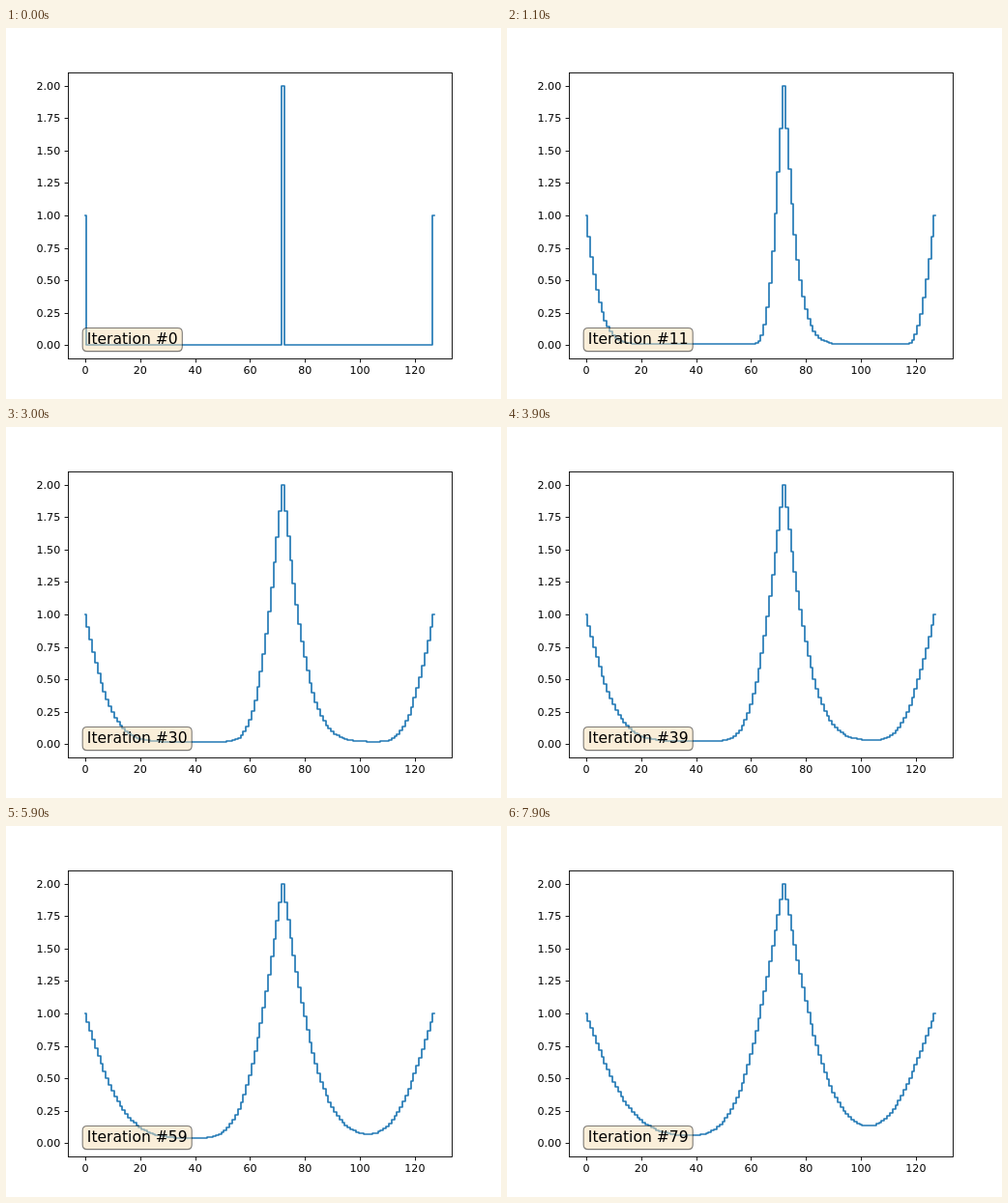
These frames come from a looping animation (512 px wide and 384 px high, 8000 ms). An HTML page with a canvas:

```html
<!DOCTYPE html>
<html lang="en">
<head>
<meta charset="utf-8">
<title>Relaxation</title>
<style>
html, body { margin: 0; width: 100%; height: 100%; overflow: hidden; background: #fff; }
canvas { display: block; }
</style>
</head>
<body>
<canvas id="plot" width="512" height="384"></canvas>
<script>
const ctx = document.getElementById('plot').getContext('2d');
const N = 128, PEAK = 72, STEPS = 80, STEP_MS = 100;
const SOURCE = 10 / N ** 2;
const FONT = '"DejaVu Sans", sans-serif';
const px = x => 82.036 + x * 2.8404;
const py = y => 328.32 - y * 134.4;
const snap = v => Math.floor(v + 0.5);

// Gauss-Seidel sweeps with both ends and the peak held fixed
const states = [new Float64Array(N)];
states[0][0] = states[0][N - 1] = 1;
states[0][PEAK] = 2;
for (let k = 1; k < STEPS; k++) {
  const u = states[k - 1].slice();
  for (let i = 1; i < N - 1; i++) {
    if (i !== PEAK) u[i] = (u[i - 1] + u[i + 1] + SOURCE) / 2;
  }
  states.push(u);
}

function segment(x1, y1, x2, y2) {
  ctx.beginPath();
  ctx.moveTo(x1, y1);
  ctx.lineTo(x2, y2);
  ctx.stroke();
}

function drawAxes() {
  ctx.strokeStyle = ctx.fillStyle = '#000';
  ctx.lineWidth = 0.889;
  ctx.lineCap = 'butt';
  ctx.lineJoin = 'miter';
  ctx.strokeRect(64.5, 46.5, 397, 296);
  ctx.font = '11.11px ' + FONT;
  ctx.textAlign = 'center';
  for (let v = 0; v <= 120; v += 20) {
    const x = snap(px(v)) + 0.5;
    segment(x, 342.5, x, 346.4);
    ctx.fillText(v, px(v), 358);
  }
  ctx.textAlign = 'right';
  for (let v = 0; v <= 2; v += 0.25) {
    const y = snap(py(v)) + 0.5;
    segment(60.6, y, 64.5, y);
    ctx.fillText(v.toFixed(2), 56.2, snap(py(v) + 4));
  }
}

function drawCurve(u) {
  ctx.strokeStyle = '#1f77b4';
  ctx.lineWidth = 1.667;
  ctx.lineCap = 'square';
  ctx.lineJoin = 'round';
  ctx.beginPath();
  for (let i = 0; i < N; i++) {
    const y = snap(py(u[i]));
    ctx.lineTo(snap(px(Math.max(i - 0.5, 0))), y);
    ctx.lineTo(snap(px(Math.min(i + 0.5, N - 1))), y);
  }
  ctx.stroke();
}

function drawLabel(k) {
  const text = 'Iteration #' + k;
  ctx.font = '15.56px ' + FONT;
  ctx.textAlign = 'left';
  const pad = 4.67, l = 83.84 - pad, t = 310.5, b = 334.6;
  const r = 83.84 + ctx.measureText(text).width + pad;
  ctx.beginPath();
  ctx.moveTo(l + pad, t);
  ctx.lineTo(r - pad, t);
  ctx.quadraticCurveTo(r, t, r, t + pad);
  ctx.lineTo(r, b - pad);
  ctx.quadraticCurveTo(r, b, r - pad, b);
  ctx.lineTo(l + pad, b);
  ctx.quadraticCurveTo(l, b, l, b - pad);
  ctx.lineTo(l, t + pad);
  ctx.quadraticCurveTo(l, t, l + pad, t);
  ctx.closePath();
  ctx.fillStyle = 'rgba(245, 222, 179, 0.5)';
  ctx.fill();
  ctx.strokeStyle = 'rgba(0, 0, 0, 0.5)';
  ctx.lineWidth = 1.11;
  ctx.stroke();
  ctx.fillStyle = '#000';
  ctx.fillText(text, 83.84, 327);
}

function draw(now) {
  const k = Math.floor(now / STEP_MS) % STEPS;
  ctx.fillStyle = '#fff';
  ctx.fillRect(0, 0, 512, 384);
  drawCurve(states[k]);
  drawAxes();
  drawLabel(k);
}

let start;
function tick(now) {
  start ??= now;
  draw(now - start);
  requestAnimationFrame(tick);
}
draw(0);
requestAnimationFrame(tick);
</script>
</body>
</html>
```
